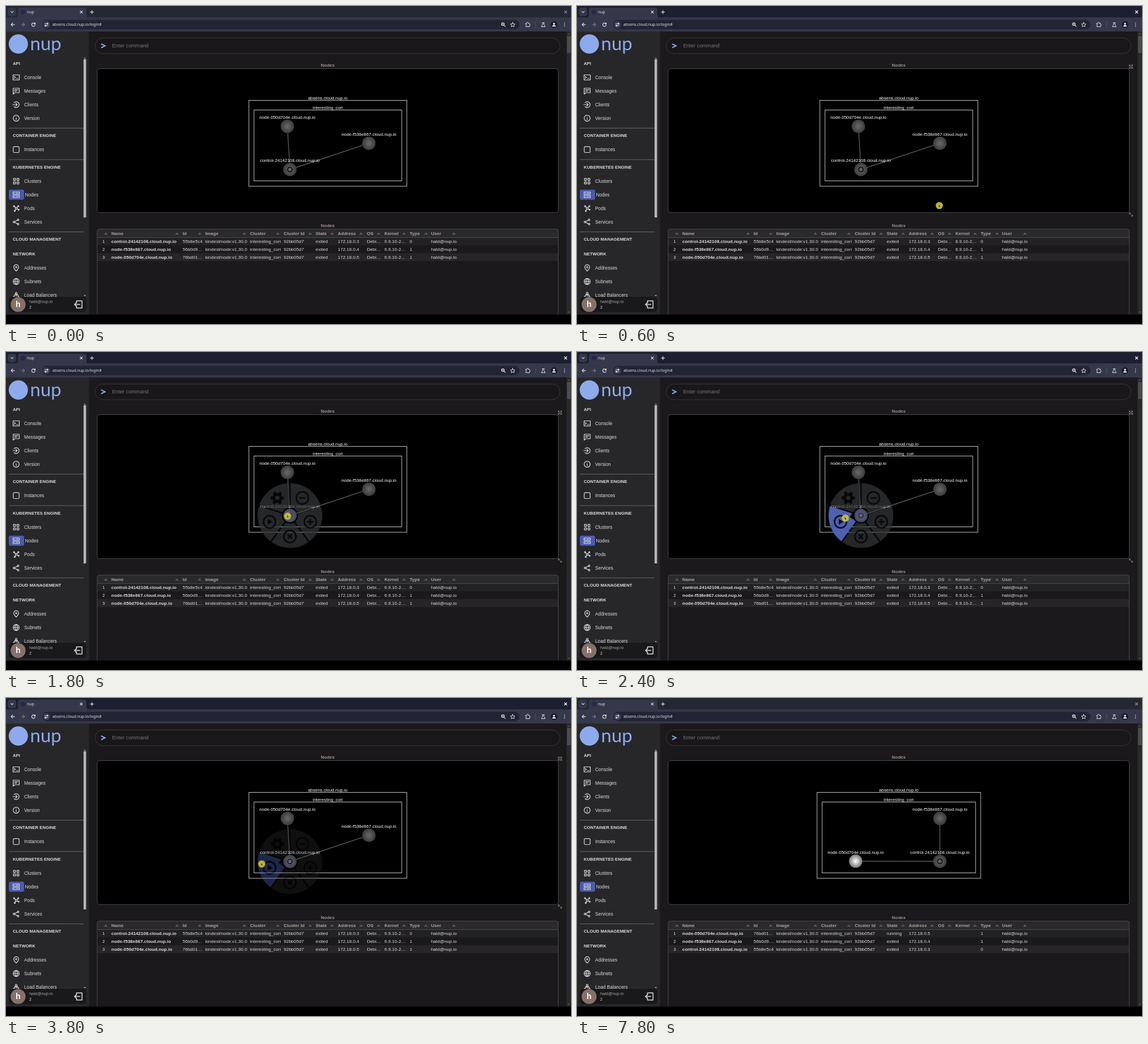
Recreate the animation shown at these times as an HTML page. Size 998 by 561 pixels, loop 8000 ms.

```html
<!DOCTYPE html>
<html lang="en">
<head>
<meta charset="utf-8">
<title>Nodes</title>
<style>
html, body { margin: 0; width: 100%; height: 100%; overflow: hidden; background: #000; }
svg { display: block; width: 100vw; height: 100vh; }
text { font: 8px "Liberation Sans", Arial, sans-serif; fill: #dcdad8; white-space: pre; }
.bold { font-weight: bold; }
.title { font-weight: bold; fill: #99938d; text-anchor: middle; }
.head { font-weight: bold; fill: #aaa5a0; }
.section { font-size: 7.7px; font-weight: bold; }
.item { font-size: 8.3px; }
.label { font-size: 7.83px; text-anchor: middle; fill: #fff; }
.ui { font: 6.8px "Noto Sans", sans-serif; fill: #dfe0ea; }
.line { fill: none; stroke: #dddcdc; stroke-width: 1.2; stroke-linecap: round; stroke-linejoin: round; }
.box { fill: none; stroke: #c4c4c4; stroke-width: 1; }
.edge { stroke: #595959; stroke-width: 1.4; }

/* one loop = 8000 ms, so 100 ms = 1.25% */
.before, .after, .focus, .blur, .cursor, .tableHover, .graphHover, .menu, .pick { animation: 8s step-end infinite; }
.before { animation-name: before; }
.after { animation-name: after; }
.focus { animation-name: focus; }
.blur { animation-name: blur; }
.cursor { animation-name: cursor; }
.tableHover { animation-name: tableHover; }
.graphHover { animation-name: graphHover; }
.menu { animation-name: menu; }
.pick { animation-name: pick; }
@keyframes before { 0% { opacity: 1 } 97.5%, 100% { opacity: 0 } }
@keyframes after { 0% { opacity: 0 } 97.5%, 100% { opacity: 1 } }
@keyframes focus { 0% { opacity: 0 } 1.25% { opacity: 1 } 97.5%, 100% { opacity: 0 } }
@keyframes blur { 0% { opacity: 1 } 1.25% { opacity: 0 } 97.5%, 100% { opacity: 1 } }
@keyframes tableHover { 0% { opacity: 0 } 1.25% { opacity: 1 } 7.5%, 100% { opacity: 0 } }
@keyframes graphHover { 0% { opacity: 0 } 7.5% { opacity: 1 } 58.75%, 100% { opacity: 0 } }
@keyframes menu {
  0% { opacity: 0 } 22.5% { opacity: 1 } 45% { opacity: .8 } 46.25% { opacity: .6 }
  47.5% { opacity: .4 } 48.75% { opacity: .2 } 50%, 100% { opacity: 0 }
}
@keyframes pick { 0% { opacity: 0 } 27.5%, 100% { opacity: 1 } }
@keyframes cursor {
  0% { transform: translate(975px, 523px); opacity: 0 }
  1.25% { transform: translate(960px, 522px); opacity: 1 }
  2.5% { transform: translate(898px, 478px); opacity: 1 }
  3.75% { transform: translate(815px, 435px); opacity: 1 }
  5% { transform: translate(742px, 399px); opacity: 1 }
  6.25% { transform: translate(690px, 376px); opacity: 1 }
  7.5% { transform: translate(640px, 352px); opacity: 1 }
  8.75% { transform: translate(592px, 331px); opacity: 1 }
  10% { transform: translate(550px, 312px); opacity: 1 }
  11.25% { transform: translate(515px, 297px); opacity: 1 }
  12.5% { transform: translate(496.8px, 290.5px); opacity: 1 }
  20% { transform: translate(497.5px, 289.5px); opacity: 1 }
  25% { transform: translate(495px, 290px); opacity: 1 }
  26.25% { transform: translate(491px, 290px); opacity: 1 }
  27.5% { transform: translate(486px, 291px); opacity: 1 }
  28.75% { transform: translate(480px, 292px); opacity: 1 }
  30% { transform: translate(474px, 293px); opacity: 1 }
  31.25% { transform: translate(468px, 294px); opacity: 1 }
  32.5% { transform: translate(463px, 294px); opacity: 1 }
  33.75% { transform: translate(459px, 294px); opacity: 1 }
  35% { transform: translate(456px, 293px); opacity: 1 }
  37.5% { transform: translate(453px, 293px); opacity: 1 }
  38.75% { transform: translate(451.7px, 292.7px); opacity: 1 }
  67.5%, 100% { transform: translate(451.7px, 292.7px); opacity: 0 }
}
</style>
</head>
<body>
<svg viewBox="0 0 998 561" preserveAspectRatio="none">
  <defs>
    <radialGradient id="idle"><stop stop-color="#696969"/><stop offset="1" stop-color="#3b3b3b"/></radialGradient>
    <radialGradient id="running"><stop stop-color="#fff"/><stop offset="1" stop-color="#777"/></radialGradient>
    <mask id="gaps" maskUnits="userSpaceOnUse" x="-60" y="-60" width="120" height="120">
      <circle r="57.3" fill="#fff"/>
      <g id="spokes" stroke="#000" stroke-width="2.2"></g>
      <circle r="14" fill="#000"/>
    </mask>
    <path id="sort" d="M-3.5 2 0-2 3.5 2z" fill="#5b5a5b"/>
    <g id="expand" class="line" style="stroke:#85858a;stroke-width:1">
      <path d="M-3-3 3 3M3-3-3 3M-3-1V-3H-1M1-3H3V-1M3 1V3H1M-1 3H-3V1"/>
    </g>
  </defs>

  <!-- browser window -->
  <rect width="998" height="24" fill="#1d1f30"/>
  <rect class="blur" width="998" height="24" fill="#252733"/>
  <rect y="20" width="998" height="25" fill="#35374a"/>
  <path d="M17 20q4 0 4-4V7q0-4 4-4H138q4 0 4 4v9q0 4 4 4z" fill="#35374a"/>
  <rect x="3" y="3" width="15" height="15" rx="4.5" fill="#35374a"/>
  <rect x="64" y="24.5" width="843" height="16.5" rx="8.2" fill="#222433"/>
  <circle cx="71.5" cy="32.8" r="6.3" fill="#393b50"/>
  <circle cx="30" cy="10.8" r="4.3" fill="#222a4a"/>
  <text class="ui" x="37" y="13.2">nup</text>
  <text class="ui" x="82" y="35.2">absens.cloud.nup.io/login#</text>
  <g class="line">
    <path d="M8.8 9.7l2 2 2-2M131 8.7l4 4m0-4-4 4M149 10.7h5.6m-2.8-2.8v5.6"/>
    <path d="M15 32.8H9.2M11.8 30 9 32.8l2.8 2.8"/>
    <path d="M27 32.8h5.8M30.2 30l2.8 2.8-2.8 2.8" stroke="#777989"/>
    <path d="M50.9 31.2a3 3 0 1 0 .5 2.3M51.6 29.5v2.2h-2.2"/>
    <path d="M68.7 31.2h2.5M74 34.7h-2.6" stroke-width="1"/>
    <circle cx="73.2" cy="31.2" r="1"/><circle cx="69.7" cy="34.7" r="1"/>
    <circle cx="877.7" cy="32" r="2.4"/><path d="M879.6 33.9l2.2 2.2M876.7 32h2"/>
    <path d="M895 29l1.2 2.6 2.8.3-2.1 1.9.6 2.8-2.5-1.4-2.5 1.4.6-2.8-2.1-1.9 2.8-.3z" stroke-width="1"/>
    <path d="M918.3 30.5h2q0-2 1.2-2t1.2 2h2v2q1.4 0 1.4 1t-1.4 1v2h-6.4v-2q1.4-.2 1.4-1t-1.4-1z" stroke-width="1"/>
    <path d="M935.5 28v9" stroke="#55576b" stroke-width=".8"/>
    <path d="M947.2 29.5h3.6M948 29.5v2.6l-2.3 4.4h6.6l-2.3-4.4v-2.6" stroke-width="1"/>
  </g>
  <circle cx="968" cy="32.8" r="5.8" fill="#171827"/>
  <circle cx="968" cy="31.2" r="1.7" fill="#eee"/><path d="M964.8 36.2q0-2.6 3.2-2.6t3.2 2.6z" fill="#eee"/>
  <g fill="#ddd"><circle cx="986.5" cy="30" r=".8"/><circle cx="986.5" cy="32.8" r=".8"/><circle cx="986.5" cy="35.6" r=".8"/></g>
  <path class="line blur" d="M986.5 8.5l4 4m0-4-4 4" style="stroke:#888993"/>
  <path class="line focus" d="M986.5 8.5l4 4m0-4-4 4" style="stroke:#fff"/>

  <!-- page -->
  <rect y="45" width="998" height="499.5" fill="#1b191c"/>
  <rect y="45" width="146.5" height="499.5" fill="#27272a"/>
  <rect x="990" y="45" width="8" height="499.5" fill="#29292b"/>
  <rect x="991" y="53" width="6.5" height="30" fill="#4b4b4d"/>
  <path d="M992 50.5l2-2.5 2 2.5zM992 539l2 2.5 2-2.5z" fill="#5a5a5c"/>

  <!-- sidebar -->
  <circle cx="21.8" cy="67" r="17" fill="#8daaec"/>
  <text x="42.5" y="78" style="font:33px Lato,sans-serif;fill:#8daaec">nup</text>
  <rect x="137" y="94" width="4.5" height="279" fill="#b5b5b7"/>
  <path d="M137.3 92.8l1.9-2 1.9 2zM137.3 510l1.9 2 1.9-2z" fill="#b5b5b7"/>
  <path d="M5 215.5H137M5 271H137M5 398.5H137" stroke="#66666a"/>
  <rect x="5" y="324" width="27" height="17.7" rx="3" fill="#4b5bad"/>
  <g id="sidebar"></g>
  <rect y="514" width="146.5" height="30.5" fill="#27272a"/>
  <rect x="5" y="513" width="137" height="27" rx="6" fill="#19181b"/>
  <circle cx="21.4" cy="526.6" r="13.2" fill="#85716a"/>
  <text x="21.4" y="531" text-anchor="middle" style="font-size:14px;font-weight:bold;fill:#fff">h</text>
  <text x="41" y="524" style="font-size:7.4px;fill:#a5a3a3">hald@nup.io</text>
  <text x="41" y="534.3" style="font-size:7px">2</text>
  <path class="line" d="M124.5 524V520.2h9.8v12.6h-9.8V529M130.5 526.5h-9.5m3-3-3 3 3 3" style="stroke-width:1.5"/>

  <!-- command line -->
  <rect x="157.5" y="56.5" width="821" height="27.5" rx="13.7" fill="#19171a" stroke="#38373b"/>
  <path d="M168 66.8l7 3.4-7 3.4" fill="none" stroke="#8daaec" stroke-width="1.9"/>
  <text x="187.5" y="73.3" style="font-size:9.15px;fill:#77747a">Enter command</text>

  <!-- graph -->
  <text class="title" x="568.2" y="107">Nodes</text>
  <rect x="161" y="110.5" width="814.5" height="254" rx="5" stroke="#48474a"/>
  <g id="graph"></g>
  <g class="graphHover">
    <use href="#expand" x="978.5" y="107"/>
    <path class="line" d="M975.8 365.2l5.4 5.4M975.6 367v-2h2M981.4 368.8v2h-2" style="stroke:#85858a;stroke-width:1"/>
  </g>

  <!-- table -->
  <text class="title" x="568.2" y="390.3">Nodes</text>
  <rect x="161" y="394" width="814.5" height="14.5" fill="#2a2a2c"/>
  <rect x="161" y="408.5" width="814.5" height="13.8" fill="#222124"/>
  <rect x="161" y="422.3" width="814.5" height="13.8" fill="#1b191c"/>
  <rect x="161" y="436.1" width="814.5" height="13.8" fill="#262528"/>
  <path d="M161 544.5V397q0-3.5 3.5-3.5H972q3.5 0 3.5 3.5V544.5M161 408.5H975.5" fill="none" stroke="#48474a"/>
  <g id="table"></g>
  <use class="tableHover" href="#expand" x="978.5" y="390.7"/>

  <!-- radial menu -->
  <g transform="translate(501.5 288.5)">
    <g class="menu">
      <circle r="12" fill="#5468b0" opacity=".3"/>
      <g mask="url(#gaps)">
        <circle r="57.3" fill="#333436" opacity=".76"/>
        <path id="sector" class="pick" fill="#4f60b2"/>
      </g>
      <path class="pick" d="M-12.5-8-20 2.5-10 9z" fill="#050507"/>
      <g fill="none" stroke="#070708" stroke-width="2.4">
        <circle cx="-36" cy="11" r="10.7"/><path d="M-39 5.8-31 11-39 16.2z" fill="#070708" stroke="none"/>
        <circle cx="22" cy="-31" r="10.7"/><path d="M16.5-31h11"/>
        <circle cx="36" cy="11" r="10.7"/><path d="M30.5 11h11M36 5.5v11"/>
        <circle cy="37" r="10.7"/><path d="M-3.8 33.2 3.8 40.8M3.8 33.2-3.8 40.8"/>
        <g transform="translate(-22.3 -31)">
          <circle r="6.3" stroke-width="5"/><circle r="9.7" stroke-width="4" stroke-dasharray="5 5.16" stroke-dashoffset="2.5"/>
        </g>
      </g>
    </g>
  </g>

  <g class="cursor">
    <circle r="6.3" fill="#cfc72a" opacity=".9"/>
    <path d="M-1.2-1.8V3L0 2l.9 1.8.9-.5-.9-1.7 1.5-.2z" fill="#111" stroke="#eee" stroke-width=".4"/>
  </g>
  <rect y="544.5" width="998" height="16.5"/>
</svg>

<script>
const $ = id => document.getElementById(id);
const text = (x, y, s, cls = "") => `<text class="${cls}" x="${x}" y="${y}">${s}</text>`;
const host = name => `${name}.cloud.nup.io`;

// sidebar icons are drawn around their own centre
const icons = {
  Console: "M-5.5-4.5h11v9h-11zM-3.5-1.8l2 1.8-2 1.8M.5 2h3",
  Messages: "M-5.3-5h10.6v8H-2.5L-5.3 5.5zM-3-2.4h6M-3 .2h4",
  Clients: "M-3.7-3.7A5.2 5.2 0 1 1-3.7 3.7M-6 0H1.8M-.8-2.6 1.8 0-.8 2.6",
  Version: "M-5.3 0a5.3 5.3 0 1 1 10.6 0a5.3 5.3 0 1 1-10.6 0M0-.5V2.8M0-2.7v.1",
  Instances: "M-3.4-5.2h6.8q1.8 0 1.8 1.8v6.8q0 1.8-1.8 1.8h-6.8q-1.8 0-1.8-1.8v-6.8q0-1.8 1.8-1.8z",
  Clusters: "M-4.8-4.8h3.4v3.4h-3.4zM1.4-4.8h3.4v3.4H1.4zM-4.8 1.4h3.4v3.4h-3.4zM1.4 1.4h3.4v3.4H1.4z",
  Nodes: "M-5.5-5h11v4h-11zM-5.5 1h11v4h-11zM-3.3-3h.4M-3.3 3h.4M0-3h3M0 3h3",
  Pods: "M-1.7 0a1.7 1.7 0 1 1 3.4 0a1.7 1.7 0 1 1-3.4 0M-1.2-1.2-3-3M1.2-1.2 3-3M-.8 1.5-2 3.5M1.5.8l2 1M-4.8-3.8a1 1 0 1 1 2 0a1 1 0 1 1-2 0M2.8-3.8a1 1 0 1 1 2 0a1 1 0 1 1-2 0M-3.5 4.4a1 1 0 1 1 2 0a1 1 0 1 1-2 0M3.3 2.3a1 1 0 1 1 2 0a1 1 0 1 1-2 0",
  Services: "M-5.3 0a1.4 1.4 0 1 1 2.8 0a1.4 1.4 0 1 1-2.8 0M2-3.8a1.4 1.4 0 1 1 2.8 0a1.4 1.4 0 1 1-2.8 0M2 3.8a1.4 1.4 0 1 1 2.8 0a1.4 1.4 0 1 1-2.8 0M-2.6-.7 2.1-3.1M-2.6.7 2.1 3.1",
  Addresses: "M0 5.5Q-4.3 1.4-4.3-1.3a4.3 4.3 0 1 1 8.6 0Q4.3 1.4 0 5.5zM-1.2-1.3a1.2 1.2 0 1 1 2.4 0a1.2 1.2 0 1 1-2.4 0",
  Subnets: "M-5.3 0a5.3 5.3 0 1 1 10.6 0a5.3 5.3 0 1 1-10.6 0M-5 0H5M0-5.3Q-4.5 0 0 5.3Q4.5 0 0-5.3",
  "Load Balancers": "M-1.5-3.5a1.5 1.5 0 1 1 3 0a1.5 1.5 0 1 1-3 0M-1.2-2.5-4 2M1.2-2.5 4 2M0-2V2M-5.3 3.2a1.2 1.2 0 1 1 2.4 0a1.2 1.2 0 1 1-2.4 0M2.9 3.2a1.2 1.2 0 1 1 2.4 0a1.2 1.2 0 1 1-2.4 0M-3 0Q0-1 3 0"
};
const itemY = [126, 150, 174, 198, 253.3, 309, 333, 357, 381, 462, 486, 510];
const sections = { API: 101.3, "CONTAINER ENGINE": 228.5, "KUBERNETES ENGINE": 284, "CLOUD MANAGEMENT": 411, NETWORK: 436.8 };
$("sidebar").innerHTML =
  Object.entries(sections).map(([name, y]) => text(12, y + 2.8, name, "section")).join("") +
  Object.entries(icons).map(([name, d], i) =>
    `<path class="line" transform="translate(18 ${itemY[i]})" d="${d}"/>` +
    text(name === "Nodes" ? 33.5 : 32, itemY[i] + 3, name, "item")).join("");

// node table
const columns = { Name: 186, Id: 312, Image: 352, Cluster: 431, "Cluster Id": 490.5, State: 547, Address: 586,
  OS: 637.5, Kernel: 668.5, Type: 713, User: 750.8 };
const xs = Object.values(columns);
const sortX = [176.3, 302, 342, 421, 480.3, 537, 576, 627.3, 658, 703, 742, 791.3];
const makeRow = (name, id, ip, type, state = "exited", os = "Debi…", kernel = "6.9.10-2…") =>
  [host(name), id, "kindest/node:v1.30.0", "interesting_cori", "92bb05d7", state, "172.18.0." + ip, os, kernel, type, "hald@nup.io"];
const control = makeRow("control-24142108", "55b8e5c4", 3, 0);
const second = makeRow("node-f538e867", "56b0d9…", 4, 1);
const third = makeRow("node-050d704e", "76bd01…", 5, 1);
const blank = row => row.map((v, i) => i === 7 || i === 8 ? "" : v);
const started = blank(third).map((v, i) => i === 5 ? "running" : v);
const drawRows = (rows, cls) => `<g class="${cls}">` + rows.map((row, r) =>
  row.map((v, i) => text(xs[i], 418.3 + r * 13.8, v, i ? "" : "bold")).join("")).join("") + "</g>";
$("table").innerHTML =
  Object.entries(columns).map(([name, x]) => text(x, 403.6, name, "head")).join("") +
  sortX.map(x => `<use href="#sort" x="${x}" y="401.3"/>`).join("") +
  [1, 2, 3].map(n => text(170.2, 404.5 + n * 13.8, n)).join("") +
  drawRows([control, second, third], "before") +
  drawRows([started, blank(second), blank(control)], "after");

// cluster graph: the first node is the hub
function drawGraph(cls, grow, nodes) {
  const [hub, ...others] = nodes;
  return `<g class="${cls}">
    <rect class="box" x="${429 - grow}" y="166.5" width="${279 + 2 * grow}" height="151.5"/>
    <rect class="box" x="${438 - grow}" y="183.5" width="${261 + 2 * grow}" height="125"/>` +
    text(568.3, 164.5, host("absens"), "label") + text(568.3, 182, "interesting_cori", "label") +
    others.map(n => `<line class="edge" x1="${hub.x}" y1="${hub.y}" x2="${n.x}" y2="${n.y}"/>`).join("") +
    nodes.map(n => `<circle cx="${n.x}" cy="${n.y}" r="11.8" fill="url(#${n.fill || "idle"})"/>` +
      text(n.x, n.y - 13.3, host(n.name), "label")).join("") +
    `<circle cx="${hub.x}" cy="${hub.y}" r="4" fill="none" stroke="#0a0a0a" stroke-width="1.7"/></g>`;
}
$("graph").innerHTML =
  drawGraph("before", 0, [
    { name: "control-24142108", x: 501.5, y: 288.5 },
    { name: "node-050d704e", x: 497, y: 212.3 },
    { name: "node-f538e867", x: 641, y: 242.2 }]) +
  drawGraph("after", 5, [
    { name: "control-24142108", x: 641, y: 288.2 },
    { name: "node-050d704e", x: 492.2, y: 287.8, fill: "running" },
    { name: "node-f538e867", x: 641, y: 212.6 }]);

// five menu sectors, one boundary pointing straight up
const polar = (r, deg) => [r * Math.cos(deg * Math.PI / 180), r * Math.sin(deg * Math.PI / 180)];
$("spokes").innerHTML = [0, 1, 2, 3, 4].map(k => {
  const [x, y] = polar(58, k * 72 - 90);
  return `<line x2="${x}" y2="${y}"/>`;
}).join("");
$("sector").setAttribute("d", `M0 0L${polar(57.3, 126)}A57.3 57.3 0 0 1 ${polar(57.3, 198)}z`);
</script>
</body>
</html>
```
